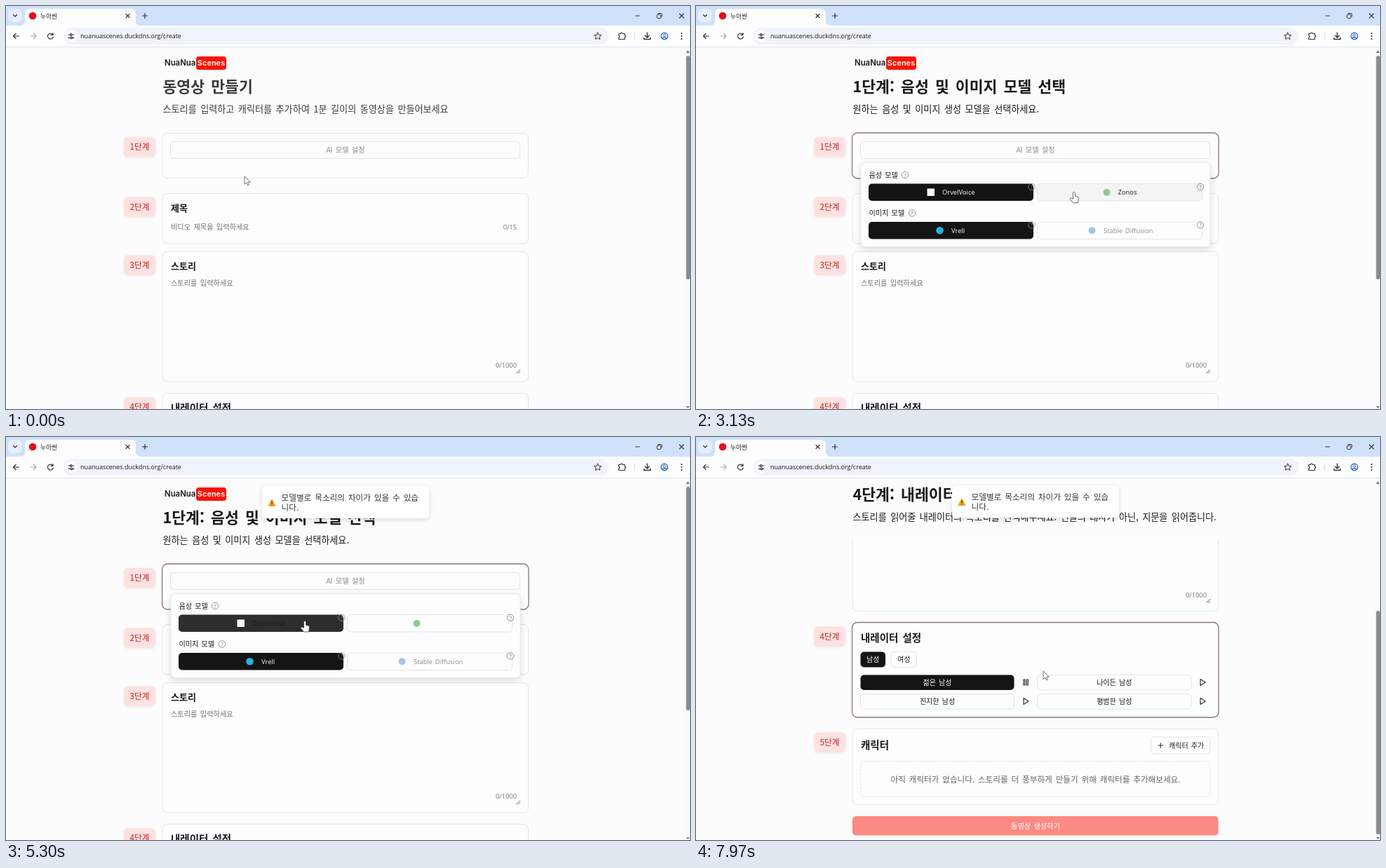
Recreate the animation shown at these times as an HTML page. Size 975 by 575 pixels, loop 8000 ms.

```html
<!DOCTYPE html>
<html lang="ko">
<head>
<meta charset="utf-8">
<title>누아씬</title>
<style>
html, body { margin: 0; width: 100%; height: 100%; overflow: hidden; background: #fcfcfd; }
svg { display: block; width: 100vw; height: 100vh; }
text { font-family: "Noto Sans CJK KR", "Noto Sans CJK", sans-serif; word-spacing: .14em; fill: #18181b; white-space: pre; }
.latin { font-family: "Open Sans", sans-serif; }
.mark { font-family: Inter, sans-serif; font-weight: 600; }
.bold { font-weight: 700; }
.medium { font-weight: 500; }
.mid { text-anchor: middle; }
.end { text-anchor: end; }
.muted { fill: #737373; }
.white { fill: #fff; }
.line { fill: none; stroke: #333; stroke-width: 1.2; stroke-linecap: round; stroke-linejoin: round; }
.box { fill: #fdfdfd; stroke: #e4e3e8; }
.glow { fill: none; stroke: #8e7887; stroke-width: 1.3; }
.toast { filter: drop-shadow(0 2px 3px #0002); }
#popover { filter: drop-shadow(0 3px 5px #0002); }
</style>
</head>
<body>
<svg id="stage" viewBox="0 0 975 575" preserveAspectRatio="none"></svg>
<script>
const LOOP = 8000, SCROLL_END = 287.5;
const CLICKS = { open: 950, zonos: 3770, voice: 5240, play: 7000 };
const TEXT_LAG = 60;

// ---------- markup helpers ----------
const rect = (x, y, w, h, r = 0, attrs = '') =>
  `<rect x="${x}" y="${y}" width="${w}" height="${h}" rx="${r}" ${attrs}/>`;
const text = (s, x, cy, size, cls = '', attrs = '') =>
  `<text x="${x}" y="${cy + size * .37}" font-size="${size}" class="${cls}" ${attrs}>${s}</text>`;
const path = (d, attrs = 'class="line"') => `<path d="${d}" ${attrs}/>`;
const circle = (x, y, r, attrs) => `<circle cx="${x}" cy="${y}" r="${r}" ${attrs}/>`;
const group = (id, body, attrs = '') => `<g id="${id}" ${attrs}>${body}</g>`;

const help = (x, y) => circle(x, y, 4.7, 'fill="none" stroke="#888" stroke-width=".9"')
  + text('?', x, y, 7.5, 'latin mid muted');
const card = (y, h) => rect(223, y, 521.5, h, 7, 'class="box"');
const glow = (id, y, h) => rect(222.5, y - .5, 522.5, h + 1, 7.5, `id="${id}" class="glow"`);
const badge = (n, y) => rect(168, y, 45, 28.5, 6, 'fill="url(#pink)" style="filter:drop-shadow(0 1px 2px #0001)"')
  + text(n + '단계', 190.5, y + 14, 11.7, 'mid medium', 'style="fill:#c32222"');
const choice = (s, x, y, w, h, dark) => rect(x, y, w, h, 5, dark ? 'fill="#141414"' : 'class="box"')
  + text(s, x + w / 2, y + h / 2, 10, dark ? 'mid white' : 'mid');
const play = (x, y, id = '') => path(`M${x - 3} ${y - 4.5}L${x + 4} ${y}L${x - 3} ${y + 4.5}Z`, `class="line" id="${id}"`);

// ---------- scene parts ----------
function browserBar() {
  return rect(0, 0, 975, 30, 0, 'fill="#d0e1fb"')
    + path('M0 28H20Q27 28 27 21V11Q27 4 34 4H178Q185 4 185 11V21Q185 28 192 28H975V59H0Z', 'fill="#fdfdfe"')
    + rect(0, 58, 975, 1, 0, 'fill="#dfe2e8"')
    + rect(3, 4, 19.5, 19, 6, 'fill="#e6eefc"') + path('M10.5 12.5L13 15L15.5 12.5')
    + circle(38, 14, 5.3, 'fill="#e3101c"')
    + text('누아씬', 49, 14.5, 8.7)
    + path('M171 11.5L176 16.5M176 11.5L171 16.5M194.500 14H201.500M198 10.500V17.500')
    + path('M897.500 14H903M960 11L966 17M966 11L960 17')
    + rect(928, 12, 5.5, 5.5, 1.5, 'class="line" style="stroke-width:1"')
    + path('M930 10.500H933.500Q935 10.500 935 12V15', 'class="line" style="stroke-width:1"')
    + path('M18.500 43H10.500M14 39.500L10.500 43L14 46.500')
    + path('M35 43H43M39.500 39.500L43 43L39.500 46.500', 'class="line" style="stroke:#aaa"')
    + path('M66.500 40.500A4 4 0 1 0 67.300 44M67 38.500V41.300H64')
    + rect(82, 31, 777, 24, 12, 'fill="#eff3fb"') + circle(93, 43, 8.5, 'fill="#fdfdfe"')
    + path('M89 41H91M94.500 41H97M89 45.300H91.500M95 45.300H97') + circle(92.7, 41, 1.3, 'class="line"') + circle(93.4, 45.3, 1.3, 'class="line"')
    + text('nuanuascenes.duckdns.org/create', 106, 43, 9, 'latin')
    + path('M843.500 38L845 41.300L848.500 41.700L845.900 44L846.600 47.500L843.500 45.700L840.400 47.500L841.100 44L838.500 41.700L842 41.300Z', 'class="line" style="stroke-width:1"')
    + path('M873.500 39.500H876Q877.500 36 879 39.500H882V42Q885 43.200 882 44.500V47.500H873.500V45Q876 43.500 873.500 42Z')
    + rect(895.5, 38, 1, 10, 0, 'fill="#c6d9f7"')
    + path('M914 38V44.500M911 42L914 45L917 42M909.500 45.500V47.500H918.500V45.500', 'class="line" style="stroke-width:1.4"')
    + circle(938.5, 43, 4.8, 'class="line" style="stroke:#1a56c4"') + circle(938.5, 41.700, 1.600, 'fill="none" stroke="#1a56c4"')
    + path('M935.500 46Q938.500 43.800 941.500 46', 'class="line" style="stroke:#1a56c4"')
    + [39, 43, 47].map(y => circle(963, y, 1.1, 'fill="#333"')).join('');
}

function page() {
  const y4 = 552.5, y5 = 704;
  return badge(1, 187) + badge(2, 272.5) + badge(3, 355.500) + badge(4, 558) + badge(5, 709)
    + card(181.5, 64) + glow('glow1', 181.5, 64)
    + group('modelButton', rect(234.5, 193.5, 498, 24, 4, 'id="modelBox" class="box"')
      + text('AI 모델 설정', 484, 205.5, 10.2, 'mid', 'id="modelText"'))
    + card(267.5, 71.5) + text('제목', 235, 288.5, 13, 'bold')
    + text('비디오 제목을 입력하세요', 235, 315.5, 10.2, 'muted') + text('0/15', 728, 315.5, 9.3, 'latin muted end')
    + card(350.5, 185.5) + text('스토리', 235, 371, 13, 'bold')
    + text('스토리를 입력하세요', 235, 395.5, 10.2, 'muted') + text('0/1000', 728, 513, 9.3, 'latin muted end')
    + path('M727.500 524L732.500 519M730.500 524L732.500 522', 'class="line" style="stroke-width:.8"')
    + card(y4, 134.500) + glow('glow4', y4, 134.500)
    + text('내레이터 설정<tspan id="suffix"> (Zonos)</tspan>', 235, 574, 14.5, 'bold')
    + choice('남성', 234.5, 594, 35.500, 22, true) + choice('여성', 278, 594, 36.500, 22)
    + choice('젊은 남성', 234.5, 627, 219, 21.5, true) + choice('나이든 남성', 486.5, 627, 219.500, 21.5)
    + choice('진지한 남성', 234.5, 654, 219, 21.5) + choice('평범한 남성', 486.5, 654, 219.500, 21.5)
    + play(470, 637.5, 'playIcon') + play(722, 637.5) + play(470, 664.5) + play(722, 664.5)
    + path('M467 633.500H469V641.500H467ZM471.300 633.500H473.300V641.500H471.300Z', 'id="pauseIcon" class="line"')
    + card(y5, 108) + text('캐릭터', 235, 727.5, 14.5, 'bold')
    + rect(648.5, 715.5, 84, 24, 5, 'class="box"') + path('M659 727.500H665.500M662.250 724.250V730.750')
    + text('캐릭터 추가', 674, 727.5, 10)
    + rect(234.5, 750.5, 498, 50, 5, 'class="box" stroke-dasharray="3 2"')
    + text('아직 캐릭터가 없습니다. 스토리를 더 풍부하게 만들기 위해 캐릭터를 추가해보세요.', 484, 776, 11.6, 'mid', 'style="fill:#62656d"')
    + rect(223, 828.5, 521.5, 27.5, 5, 'fill="#fb8a82"') + text('동영상 생성하기', 484, 842.5, 10.2, 'mid white');
}

const header = () => rect(160, 59, 640, 120, 0, 'fill="#fcfcfd"')
  + text('NuaNua', 226, 81, 11.4, 'mark')
  + rect(271, 72, 43, 19, 4, 'fill="#fa1505"') + text('Scenes', 292.5, 81, 11, 'mark mid white')
  + group('heading', text('', 223.5, 115.5, 21.6, 'bold', 'id="title"') + text('', 223.5, 147.5, 13.1, '', 'id="subtitle"'));

const option = (id, label, x, y, tx, icon) =>
  rect(x, y, 235, 24.5, 5, `id="${id}Box" class="box"`) + icon
  + text(label, tx, y + 12.5, 9.4, 'latin', `id="${id}Text"`) + help(x + 232.5, y + 4.5);

const popover = () => rect(235, 223.5, 498, 120, 6, 'fill="#fdfdfe" stroke="#e8e8ea"')
  + text('음성 모델', 246.5, 241, 10.1) + help(298, 241)
  + text('이미지 모델', 246.5, 295.5, 10.1) + help(308, 295.5)
  + option('voice', 'OrvelVoice', 246, 253.5, 351, rect(329.5, 260.5, 10.5, 10.5, 0, 'fill="#f8f7f3"'))
  + option('zonos', 'Zonos', 486.5, 253.5, 601.5, circle(585.5, 266, 5, 'fill="#8cca8c"'))
  + option('image', 'Vrell', 246, 308, 364, circle(347.5, 320.3, 5.3, 'fill="#22b5d6"'))
  + option('diffusion', 'Stable Diffusion', 486.5, 308, 581, circle(564.5, 320.3, 5, 'fill="#a8c4de"'));

const toast = id => group(id, rect(-119, -23, 238, 46, 5, 'fill="#fefefe"')
  + path('M-105 -4L-99.800 5.500H-110.200Z', 'fill="#f8a51b" stroke="#f8a51b" stroke-linejoin="round"')
  + path('M-105 -1.500V2M-105 4V4.200', 'class="line"')
  + text('모델별로 목소리의 차이가 있을 수 있습', -91.500, -6.800, 11.65, '', 'style="fill:#363636"')
  + text('니다.', -91.500, 7.700, 11.65, '', 'style="fill:#363636"'), 'class="toast"');

const scrollbar = () => rect(968, 59, 7, 516, 0, 'fill="#fafafa"')
  + path('M972 63L974.500 67H969.500ZM972 574L974.500 571H969.500Z', 'fill="#777"')
  + rect(969.5, 71, 5.5, 319, 2.5, 'id="thumb" fill="#8b8b8d"');

const cursor = () => path('M0 0V11.500L2.700 9L4.600 13L6.400 12.100L4.600 8.300H8.300Z',
    'id="arrow" fill="#fff" stroke="#555" stroke-width=".8" stroke-linejoin="round"')
  + path('M-1.500 1Q0 -1 1.500 1V6L5 6.800Q6.500 7.300 6.500 9L5.500 15.500H-1.500L-6 9.800Q-5 7.800 -1.500 10Z',
    'id="hand" fill="#fff" stroke="#444" stroke-width=".8" stroke-linejoin="round"');

document.getElementById('stage').innerHTML =
  `<defs><linearGradient id="pink"><stop stop-color="#fee2dc"/><stop offset="1" stop-color="#fde1e5"/></linearGradient>
   <clipPath id="view">${rect(0, 59, 975, 516)}</clipPath></defs>`
  + rect(0, 0, 975, 575, 0, 'fill="#fcfcfd"')
  + `<g clip-path="url(#view)">${group('page', page())}${group('header', header())}${group('popover', popover())}${toast('toast1')}${toast('toast2')}${scrollbar()}</g>`
  + browserBar() + group('cursor', cursor());

const el = {};
document.querySelectorAll('[id]').forEach(node => el[node.id] = node);

// ---------- motion ----------
const ramp = (t, from, to) => Math.min(1, Math.max(0, (t - from) / (to - from)));
const smooth = p => p * p * (3 - 2 * p);
const easeOut = p => 1 - (1 - p) ** 3;
function bezier(x1, y1, x2, y2) {
  const at = (a, b, s) => 3 * a * s * (1 - s) ** 2 + 3 * b * s * s * (1 - s) + s ** 3;
  return p => {
    let lo = 0, hi = 1;
    for (let i = 0; i < 20; i++) {
      const mid = (lo + hi) / 2;
      if (at(x1, x2, mid) < p) lo = mid; else hi = mid;
    }
    return at(y1, y2, hi);
  };
}
const enterEase = bezier(.21, 1.02, .73, 1), exitEase = bezier(.06, .71, .55, 1);

// Each stop: arrival starts, arrival ends, x, y
const STOPS = [
  [0, 0, 340, 243], [0, 600, 480.5, 207.5], [1250, 1950, 396, 270.5], [2600, 3400, 590, 263.5],
  [4400, 5120, 426, 262.5], [5320, 5600, 432, 306], [6100, 6650, 470, 347], [7350, 7900, 495, 334]
];
function pointerAt(t) {
  let [, , x, y] = STOPS[0];
  for (const [from, to, nx, ny] of STOPS.slice(1)) {
    const p = smooth(ramp(t, from, to));
    x += (nx - x) * p;
    y += (ny - y) * p;
  }
  return [x, y];
}

const HEADINGS = [
  ['동영상 만들기', '스토리를 입력하고 캐릭터를 추가하여 1분 길이의 동영상을 만들어보세요'],
  ['1단계: 음성 및 이미지 모델 선택', '원하는 음성 및 이미지 생성 모델을 선택하세요.'],
  ['4단계: 내레이터 설정', '스토리를 읽어줄 내레이터의 목소리를 선택해주세요. 인물의 대사가 아닌, 지문을 읽어줍니다.']
];
const SWAPS = [170, 5770], FADE = 200;

const show = (node, visible) => node.style.display = visible ? '' : 'none';
const grey = n => `rgb(${n},${n},${n})`;

function drawOption(id, selected, hovered, textLight) {
  el[id + 'Box'].style.fill = grey(selected ? (hovered ? 46 : 20) : (hovered ? 244 : 253));
  el[id + 'Box'].style.stroke = selected ? 'none' : '';
  el[id + 'Text'].style.fill = grey(24 + 229 * textLight);
}

function drawToast(node, t, start, shift) {
  const enter = enterEase(ramp(t, start, start + 350));
  const exit = exitEase(ramp(t, start + 4000, start + 4400));
  const y = 92 + shift - 92 * (1 - enter) - 69 * exit;
  show(node, t >= start);
  node.setAttribute('transform', `translate(484 ${y}) scale(${.6 + .4 * enter - .4 * exit})`);
  node.style.opacity = (.5 + .5 * enter) * (1 - exit);
}

function render(t) {
  const scroll = SCROLL_END * easeOut(ramp(t, 5390, 5650));
  const [x, y] = pointerAt(t);
  const over = (left, top, w, h) => x >= left && x <= left + w && y + scroll >= top && y + scroll <= top + h;
  const open = ramp(t, CLICKS.open, CLICKS.open + 150);
  const zonos = t >= CLICKS.zonos && t < CLICKS.voice;

  el.page.setAttribute('transform', `translate(0 ${-scroll})`);
  el.header.setAttribute('transform', `translate(0 ${-Math.min(scroll, 33)})`);
  el.thumb.setAttribute('y', 71 + 177 * scroll / SCROLL_END);
  el.thumb.setAttribute('height', zonos ? 311 : 319);

  const step = SWAPS.filter(s => t >= s).length;
  const [title, subtitle] = HEADINGS[step];
  el.title.textContent = title;
  el.subtitle.textContent = subtitle;
  el.heading.style.opacity = Math.min(...SWAPS.map(s => Math.min(1, Math.abs(t - s) / FADE)));
  el.glow1.style.opacity = ramp(t, SWAPS[0], SWAPS[0] + 150) - ramp(t, SWAPS[1], SWAPS[1] + 150);
  el.glow4.style.opacity = ramp(t, SWAPS[1], SWAPS[1] + 150);

  const overModel = over(234.5, 193.5, 498, 24);
  el.modelBox.style.fill = overModel ? '#f3f3f2' : '';
  el.modelText.style.opacity = overModel ? 1 : .5;

  const overVoice = open > 0 && over(246, 253.5, 235, 24.5);
  const overZonos = open > 0 && over(486.5, 253.5, 235, 24.5);
  const fadeAt = click => ramp(t, click + TEXT_LAG, click + TEXT_LAG + 150);
  const zonosLight = fadeAt(CLICKS.zonos) - fadeAt(CLICKS.voice);
  show(el.popover, open > 0 && scroll < SCROLL_END - 1);
  el.popover.style.opacity = open;
  el.popover.setAttribute('transform', `translate(0 ${-scroll - 6 * (1 - open)})`);
  drawOption('voice', !zonos, overVoice, 1 - zonosLight);
  drawOption('zonos', zonos, overZonos, zonosLight);
  drawOption('image', true, false, 1);
  drawOption('diffusion', false, false, .5);
  show(el.suffix, zonos);

  const first = CLICKS.zonos + TEXT_LAG, second = CLICKS.voice + TEXT_LAG;
  drawToast(el.toast1, t, first, 50 * enterEase(ramp(t, second, second + 230)));
  drawToast(el.toast2, t, second, 0);

  const playing = t >= CLICKS.play;
  show(el.playIcon, !playing);
  show(el.pauseIcon, playing);

  const pointing = overModel || overVoice || overZonos || over(462, 629, 17, 17);
  show(el.hand, pointing);
  show(el.arrow, !pointing);
  el.cursor.setAttribute('transform', `translate(${x} ${y})`);
}

const start = performance.now();
function tick() {
  render((performance.now() - start) % LOOP);
  requestAnimationFrame(tick);
}
tick();
</script>
</body>
</html>
```
